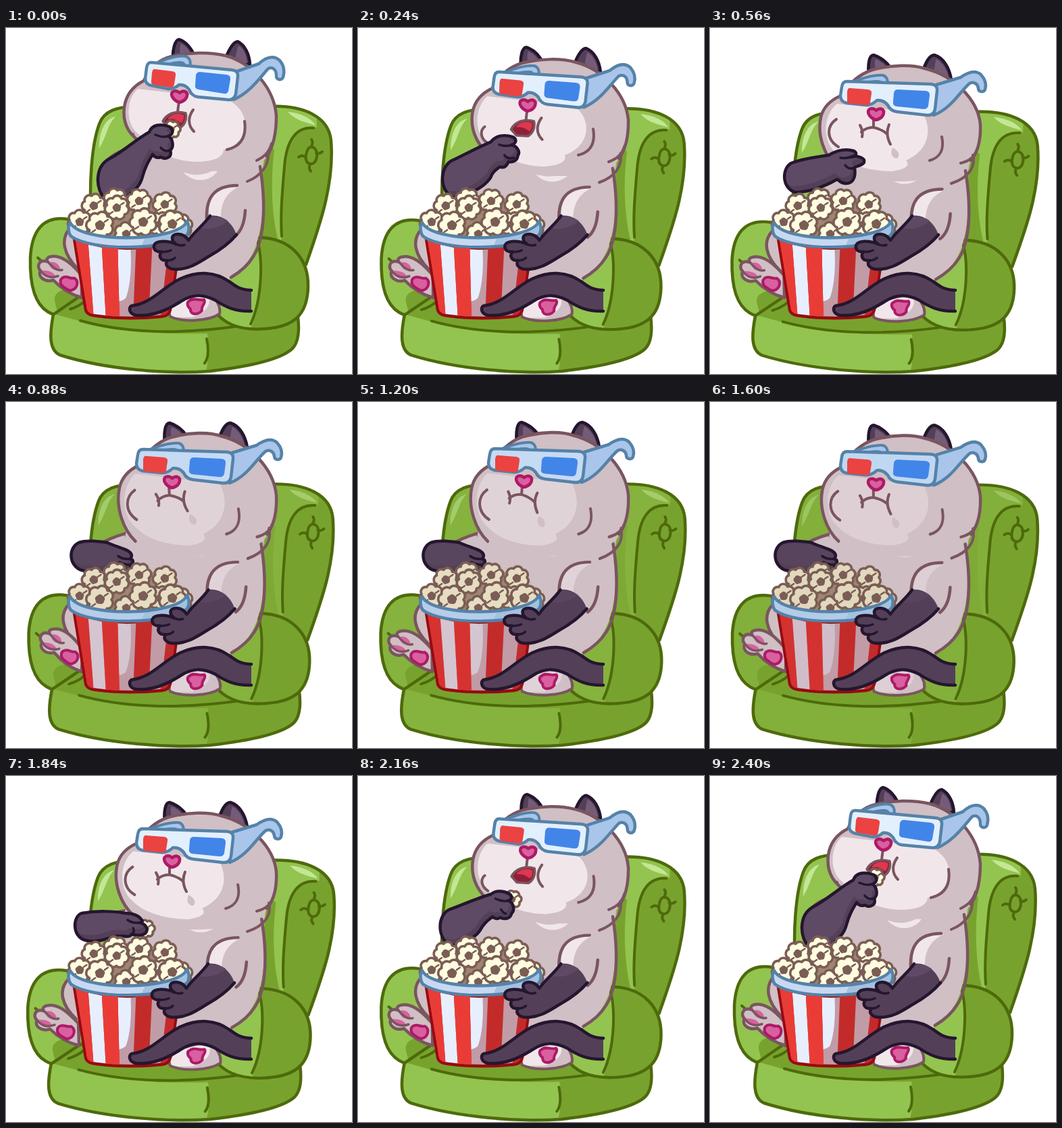
These frames come from a looping animation (512x512 px, 2.48 s). An HTML page:

```html
<!DOCTYPE html>
<html lang="en">
<head>
<meta charset="utf-8">
<title>Cat at the movies</title>
<style>
  html, body { margin: 0; width: 100%; height: 100%; overflow: hidden; background: #fff; }
  svg { display: block; width: 100%; height: 100%; }
  path { stroke-linecap: round; stroke-linejoin: round; }
</style>
</head>
<body>
<svg id="stage" viewBox="0 0 512 512"></svg>
<script>
const LOOP = 2480, STEP = 80;
const stage = document.getElementById('stage');
const moving = [], lights = [];
let clips = 0;

const C = {
  green: '#78a22e', lime: '#93c44f', leaf: '#4e6a0b', shine: '#c3e795',
  fur: '#d0bfc4', pale: '#f1e7eb', furInk: '#7a5560',
  dark: '#534058', soft: '#5f4a65', mauve: '#745c78', darkInk: '#25162f',
  pink: '#d9609f', pinkInk: '#ad1a66',
  sky: '#a9c5ea', ice: '#e2effd', steel: '#5582a8', rim: '#a5c1e0',
  red: '#c32b2b', hot: '#ea3c37', brick: '#980a12', rose: '#c19ba5', white: '#e7effe',
  corn: '#cdbfa6', cream: '#fffce0', husk: '#7a5d54'
};

function el(tag, attrs, parent = stage) {
  const node = document.createElementNS(stage.namespaceURI, tag);
  for (const k in attrs) node.setAttribute(k, attrs[k]);
  return parent.appendChild(node);
}
const group = parent => el('g', {}, parent);

// d is one path, or a list of poses blended by the named track
function path(g, d, attrs, track) {
  const poses = Array.isArray(d) ? d : [d];
  const node = el('path', { d: poses[0], ...attrs }, g);
  if (poses.length > 1) {
    moving.push({ node, track, text: poses[0], sets: poses.map(p => p.match(/-?[\d.]+/g).map(Number)) });
  }
  return node;
}
const fill = (g, d, color, track) => path(g, d, { fill: color }, track);
const line = (g, d, color, width = 4.5, track) =>
  path(g, d, { fill: 'none', stroke: color, 'stroke-width': width }, track);
function lit(g, d, color, track) {
  const node = fill(g, d, color, track);
  lights.push(node);
  return node;
}
// Filled shape, clipped highlights (path, colour, offset), then its outline
function solid(g, d, color, ink, glow = [], width = 4.5, track) {
  fill(g, d, color, track);
  if (glow.length) {
    const id = 'clip' + clips++;
    fill(el('clipPath', { id }, g), d, '#000', track);
    const inner = el('g', { 'clip-path': `url(#${id})` }, g);
    for (const [shape, tone, shift = '0 0'] of glow) {
      put(lit(inner, shape, tone, track), `translate(${shift})`);
    }
  }
  line(g, d, ink, width, track);
}
function put(node, transform) { node.setAttribute('transform', transform); }
function show(node, on) { node.setAttribute('visibility', on ? 'visible' : 'hidden'); }

// ---------- armchair ----------
const room = group(), chair = group(room);
solid(chair, 'M127 290C122 230 127 172 138 142C145 122 165 117 190 116L390 116C442 114 478 132 481 167C486 230 465 290 444 350L300 420L130 310Z',
  C.green, C.leaf, [
    ['M100 100H460V147C430 146 415 165 412 205C408 250 406 280 408 320H100Z', C.lime],
    ['M385 170L397 180C392 220 392 270 402 312L370 312Z', C.green],
    ['M138 178C137 155 146 134 162 131C150 143 150 158 138 178Z', C.shine],
    ['M417 124C437 126 452 134 458 144C445 140 428 137 417 124Z', C.shine]
  ]);
line(chair, 'M455 148C430 146 415 165 412 205C408 250 406 280 408 308', C.leaf, 4);
line(chair, 'M451 176C458 176 461 183 460 190C459 198 455 202 450 201C445 200 443 195 444 188C445 181 447 177 451 176ZM452 175Q455 169 452 165M459 185Q464 187 468 183M450 202Q447 207 451 212M443 191Q438 187 433 191', C.leaf, 4);

solid(chair, 'M130 283H92C55 277 38 300 36 340C35 380 42 408 62 420C75 428 90 428 110 426L160 420V283Z',
  C.green, C.leaf, [['M30 270H160V400L112 390C90 382 70 388 72 404L78 428H30Z', C.lime]]);
line(chair, 'M47 340L55 347', C.leaf, 4);

solid(chair, 'M70 424C64 455 64 477 80 484C150 506 240 512 300 508C360 501 405 490 422 476C434 466 434 445 432 428L330 380L112 395Z',
  C.green, C.leaf, [['M60 420L110 434C180 452 240 453 298 452C301 475 300 495 294 515H60Z', C.lime]]);
line(chair, 'M95 416Q108 412 117 404M110 433C170 450 250 455 345 441M297 460C300 475 300 488 294 496', C.leaf, 4);

solid(chair, 'M340 310H372C420 310 448 340 447 383C446 420 430 437 400 443C365 449 328 446 308 418L330 360Z',
  C.green, C.leaf, [['M300 300H371C381 335 379 400 362 446L300 450Z', C.lime]]);
line(chair, 'M371 312C381 340 379 402 362 438', C.leaf, 4);

// ---------- body ----------
const body = group(room);
const shoulder = [
  'M176 180C165 184 156 189 150 196L165 225L195 225Z',
  'M182 192C175 194 168 197 160 202L165 225L190 225Z',
  'M178 190C160 195 145 202 130 212L165 245L190 240Z',
  'M178 192C165 194 155 198 150 204L165 230L190 225Z'
];
shoulder.push(shoulder[0]);
solid(body, shoulder, C.fur, C.furInk, [], 4.5, 'arm');
fill(body, 'M180 178L168 250L95 292C82 312 84 335 108 360L130 410L245 420L330 372C365 350 386 310 379 210L385 170Z', C.fur);
line(body, 'M95 296C80 312 85 335 106 356M376 205C384 255 384 310 366 338C357 353 345 362 333 369', C.furInk);
lit(body, 'M262 213C282 221 300 217 315 205C314 222 282 236 262 213Z', C.pale);
lit(body, 'M301 282C297 250 308 238 346 234C325 244 317 260 318 284Z', C.pale);
line(body, 'M342 233C305 233 296 255 297 282M354 270C353 288 349 300 339 308', C.furInk);
solid(body, 'M243 427C235 408 262 396 298 392C312 400 318 412 316 423C300 434 262 436 243 427Z', C.fur, C.furInk,
  [['M240 428C235 405 270 398 298 394C305 405 300 420 275 428Z', C.pale]], 4);
solid(body, 'M271 404C277 398 285 404 293 402C297 407 288 411 290 418C283 426 272 424 273 416C268 412 267 406 271 404Z', C.pink, C.pinkInk, [], 4);

const foot = group();
solid(foot, 'M112 366C100 352 88 340 74 338C62 337 58 342 62 346C48 341 45 354 51 359C46 368 58 377 70 373C82 386 95 394 112 399Z', C.fur, C.furInk);
fill(foot, 'M64 347C72 344 79 350 80 356C72 362 64 355 64 347ZM53 359C63 358 72 362 73 368C64 373 54 366 53 359Z', C.pink);
line(foot, 'M62 346C69 354 75 360 83 358M51 359C57 367 66 371 77 367', C.furInk, 3.5);
solid(foot, 'M83 370C90 365 94 372 101 370C109 375 105 386 97 388C92 390 89 385 85 383C80 380 79 373 83 370Z', C.pink, C.pinkInk, [], 4);

// ---------- head ----------
const ears = group(), cheeks = group(), face = group();
function ear(d, inner) {
  solid(ears, d, C.dark, C.darkInk, [], 4.5, 'head');
  fill(ears, inner, C.mauve, 'head');
}
ear(['M247 48C246 32 250 18 256 17C266 20 275 30 280 44Z', 'M235 72C233 52 236 40 242 40C252 43 262 50 269 62Z'],
  ['M258 44C257 33 257 27 259 23C267 27 272 34 275 42Z', 'M245 64C244 55 243 50 245 46C253 49 258 54 263 60Z']);
ear(['M323 50C328 35 336 20 343 20C353 25 360 38 361 54Z', 'M313 70C318 52 325 40 332 40C345 44 354 58 357 76Z'],
  ['M338 50C341 38 342 30 344 26C352 31 356 40 357 52Z', 'M331 68C333 56 333 50 335 46C344 51 350 61 353 72Z']);

const skull = [
  'M206 176C190 162 171 150 175 117C178 96 190 85 204 78C212 60 225 47 245 42C270 36 300 35 325 41C365 52 397 90 400 130C400 155 396 175 386 190',
  'M188 206C170 190 158 160 164 132C168 115 180 106 194 100C207 80 222 68 240 62C270 54 300 54 318 60C360 70 396 105 400 142C401 165 397 183 386 196'
];
fill(cheeks, skull.map((d, i) => d + (i ? 'C380 230 220 240 188 206' : 'C370 222 235 220 206 176')), C.fur, 'head');
lit(cheeks, [
  'M195 90C178 105 176 140 195 156C215 176 240 198 285 198C310 197 322 190 322 180C362 170 366 122 325 105Z',
  'M188 112C166 130 166 170 188 186C205 204 240 212 270 212C292 208 296 203 290 196C326 180 328 148 315 126Z'
], C.pale, 'head');
line(cheeks, skull, C.furInk, 4.5, 'head');
line(cheeks, [
  'M188 157C188 159 190 162 194 165M353 138C356 160 349 175 327 180M388 183C390 202 378 219 357 227M393 171C389 185 381 191 371 196',
  'M187 135C172 145 172 165 190 176M343 161C347 180 340 192 325 196M389 188C393 205 384 221 357 230M396 178C391 192 383 197 371 200'
], C.furInk, 4, 'head');

const openMouth = group(face), shutMouth = group(face);
solid(openMouth, 'M232 138C238 126 252 122 266 126C268 136 264 144 257 148L240 147Z', '#8f1f38', C.furInk, [], 3.5);
fill(openMouth, 'M240 133C248 126 256 126 263 129Q264 137 259 141Q249 133 240 135Z', '#dc3850');
line(openMouth, 'M256 108L254 124M277 121C269 132 269 144 278 153', C.furInk, 4);
line(shutMouth, 'M242 134V147C236 147 229 149 224 154M242 147C250 149 257 152 262 157M222 144Q227 152 225 161M265 143Q259 157 267 172', C.furInk, 4);
fill(shutMouth, 'M270 177C279 181 282 188 277 193C270 193 266 186 270 177Z', C.fur);

const nose = group(face);
solid(nose, 'M0 9C-8 6 -13 -1 -10 -6C-7 -9 -2 -8 1 -5C5 -9 10 -8 12 -4C13 2 8 8 0 9Z', C.pink, C.pinkInk, [], 4.5);

// ---------- glasses ----------
solid(face, [
  'M222 53C236 45 255 40 266 42C272 44 274 50 272 58L264 56C264 52 262 51 258 51C250 51 244 52 238 55Z',
  'M208 81C226 74 244 69 256 70C262 72 264 78 262 86L254 84C254 80 252 79 248 79C240 79 232 80 226 83Z'
], C.sky, C.steel, [], 4, 'head');
solid(face, [
  'M342 64L374 53C385 43 396 40 405 48C412 56 412 66 410 73C408 78 399 77 400 70C400 62 395 57 388 60C374 76 360 96 337 106Z',
  'M335 84L371 73C382 65 393 62 401 69C408 77 409 85 407 91C405 96 397 95 397 89C396 82 390 79 384 82C369 95 358 118 331 129Z'
], C.sky, C.steel, [], 4.5, 'head');
solid(face, [
  'M216 51L334 62Q344 63 343 72L340 98Q337 108 327 106L284 102Q275 101 271 91Q265 83 256 84Q248 91 240 90L215 85Q206 83 206 75L208 59Q209 50 216 51Z',
  'M203 79L327 83Q337 84 336 93L333 120Q331 130 321 129L277 124Q267 123 263 114Q256 106 247 107Q240 114 231 114L202 111Q193 109 193 100L195 87Q196 79 203 79Z'
], C.sky, C.steel, [[[
  'M216 51L334 62Q344 63 343 72L340 98Q337 108 327 106L210 90L206 59Z',
  'M203 79L327 83Q337 84 336 93L333 120Q331 130 321 129L197 116L193 87Z'], C.ice]], 4.5, 'head');
fill(face, ['M221 61L246 64Q252 65 251 70L249 83Q248 89 242 88L219 84Q214 83 215 78L216 66Q217 60 221 61Z',
  'M208 89L234 91Q240 92 239 97L237 110Q236 115 230 114L207 112Q202 111 203 106L203 94Q204 88 208 89Z'], '#ea4341', 'head');
fill(face, ['M287 65L326 69Q333 70 332 76L329 93Q328 98 322 97L285 91Q279 90 280 84L281 70Q282 65 287 65Z',
  'M278 91L319 93Q326 94 325 100L323 115Q322 120 316 120L276 116Q270 115 271 109L272 96Q273 91 278 91Z'], '#4285e8', 'head');

// ---------- popcorn and raised arm ----------
function kernel(g, x, y, r, turn) {
  const ring = (n, R, bump) => {
    let d = '';
    for (let i = 0; i <= n; i++) {
      const a = turn + i * 2 * Math.PI / n;
      const at = `${(x + R * Math.cos(a)).toFixed(1)} ${(y + R * Math.sin(a)).toFixed(1)}`;
      d += i ? `A${bump} ${bump} 0 0 1 ${at}` : 'M' + at;
    }
    return d + 'Z';
  };
  const edge = ring(7, r, r * .47);
  fill(g, edge, C.corn);
  lit(g, edge, C.cream);
  line(g, edge, C.husk, 3.6);
  fill(g, ring(5, r * .38, r * .26), C.husk);
  line(g, `M${x - r * .4} ${y + r * .4}l${-r * .3} ${r * .2}M${x + r * .4} ${y - r * .3}l${r * .3} ${-r * .2}`, C.husk, 2.5);
}

const bite = group();
kernel(bite, 0, 0, 11, .4);

const arm = [
  'M148 256C130 235 133 205 152 194C175 182 192 165 212 154C216 143 228 141 242 146C249 151 247 158 240 160C247 163 249 176 243 181C246 190 238 196 229 191C223 193 219 190 217 187C211 197 206 205 202 220C198 236 188 242 172 256Z',
  'M126 243C106 237 106 208 120 200C140 192 160 191 176 188C188 181 200 178 213 182C220 186 214 190 208 191C218 188 230 192 228 199C222 206 216 203 214 207C216 220 212 231 200 230C192 229 190 224 188 224C172 233 150 243 126 243Z',
  'M112 249C92 242 92 215 108 208C120 204 135 206 150 208C160 213 172 216 180 220C187 224 187 228 184 232C190 234 188 240 184 241C186 248 182 252 176 252C172 252 168 250 166 248C160 250 150 252 140 252C130 252 120 251 112 249Z',
  'M117 243C98 238 98 208 112 203C135 199 160 200 176 203C188 203 197 207 200 212C203 215 202 217 198 217C208 219 211 228 206 233C200 237 192 236 186 234C184 238 178 238 175 237C165 236 158 237 152 240C140 244 128 246 117 243Z'
];
const creases = [
  'M240 160C234 162 228 161 221 158M243 181C237 183 232 181 229 177',
  'M208 191C202 193 198 193 193 192M214 207C208 209 203 207 200 203',
  'M184 232C176 233 170 231 166 228M184 241C178 241 172 239 168 237',
  'M198 217C190 218 184 216 180 213M186 234C190 231 190 228 188 225'
];
arm.push(arm[0]);
creases.push(creases[0]);
const paw = group();
solid(paw, arm, C.dark, C.darkInk, [[arm, C.soft, '-4 -9']], 4.5, 'arm');
line(paw, creases, C.darkInk, 3.5, 'arm');

const pile = group();
fill(pile, 'M104 304C105 275 125 256 160 254L210 250C250 258 266 280 262 304L180 320Z', '#a08573');
[[130, 263], [162, 255], [235, 261], [197, 256], [164, 266], [258, 293], [109, 287], [228, 290], [178, 305], [139, 292], [246, 290], [203, 287]]
  .forEach(([x, y], i) => kernel(pile, x, y, i > 8 ? 17 : 15, i * 1.3));

// ---------- bucket ----------
const bucket = group();
const stripe = (a, b, c, d) => `M${a} 310L${b} 310L${d} 432L${c} 432Z`;
solid(bucket, 'M101 312L118 417Q120 425 134 426Q180 432 230 427Q241 426 243 417L258 312Q180 340 101 312Z', C.rose, C.brick, [
  ['M95 305H182C188 345 184 385 177 400Q172 404 165 405L168 440H95Z', C.white]
]);
const cup = el('clipPath', { id: 'cup' }, bucket);
fill(cup, 'M103 314L120 417Q122 423 134 424Q180 430 230 425Q239 424 241 417L256 314Q180 340 103 314Z', '#000');
const bands = el('g', { 'clip-path': 'url(#cup)' }, bucket);
[[95, 121, 110, 130], [141, 165, 148, 168], [193, 217, 188, 211], [242, 265, 228, 250]].forEach((s, i) => {
  fill(bands, stripe(...s), C.red);
  if (i < 2) lit(bands, stripe(...s), C.hot);
});
solid(bucket, 'M95 288C91 292 92 303 96 308C125 330 238 330 268 306C272 300 271 291 268 286C255 317 110 319 95 288Z', C.rim, C.steel,
  [['M90 285C110 317 180 314 205 312L200 324C150 326 110 318 92 304Z', '#c6d9f1']]);

// ---------- tail and holding paw ----------
const tail = group();
const tailTop = 'M363 388C345 388 338 380 330 375C310 361 285 359 258 371C230 385 215 408 186 411C181 414 182 423 192 425C212 427 235 420 258 405C275 394 290 393 310 403C325 413 340 420 363 419';
fill(tail, tailTop + 'Z', C.dark);
line(tail, tailTop, C.darkInk);

const hold = group();
const grip = 'M302 278C292 292 280 300 270 314C262 302 246 303 246 311C246 316 249 318 252 320C240 314 221 314 219 322C218 329 224 332 230 331C225 338 229 345 239 344C233 350 241 357 250 357C270 358 285 347 300 338C318 328 331 318 341 306';
fill(hold, grip + 'C335 287 318 275 302 278Z', C.dark);
lit(hold, 'M302 280L288 296C305 300 322 292 328 285Q315 277 302 280Z', C.soft);
line(hold, grip, C.darkInk);
line(hold, 'M230 331Q238 332 244 329M239 344Q246 344 250 340M252 320Q258 323 264 321', C.darkInk, 3.5);

// ---------- motion ----------
const smooth = k => k * k * (3 - 2 * k);
const tracks = {
  arm: [[0, 0], [560, 1], [880, 2], [1600, 2], [1840, 3], [2400, 4]],
  head: [[0, 0], [480, 1], [1880, 1], [2400, 0]],
  sink: [[0, 0], [560, 1], [880, .7], [1440, .7], [1840, 1.1], [2400, 0]],
  bob: [[0, 0], [560, 0], [880, -9], [1200, -10], [1440, -9], [1840, -1], [2000, 0]],
  light: [[0, 1], [640, 1], [880, .5], [1200, .5], [1440, 0], [1840, 1]],
  foot: [[0, 0], [560, -1], [880, 3.5], [1200, -1], [1440, 3], [1840, -2], [2400, 0]],
  chew: [[0, 0], [560, 0], [880, -4], [1200, 4], [1440, -2], [1840, 0]],
  biteX: [[0, 245], [1600, 185], [1840, 207], [2400, 245]],
  biteY: [[0, 150], [1600, 250], [1840, 226], [2400, 150]]
};
function value(name, t) {
  const keys = tracks[name];
  const i = keys.findIndex(k => k[0] > t);
  if (i < 0) return keys[keys.length - 1][1];
  const [t0, a] = keys[i - 1], [t1, b] = keys[i];
  const k = (t - t0) / (t1 - t0);
  return a + (b - a) * (name === 'head' ? smooth(k) : k);
}
function blend({ text, sets }, k) {
  const i = Math.min(Math.floor(k), sets.length - 2), f = k - i;
  let n = 0;
  return text.replace(/-?[\d.]+/g, () => {
    const a = sets[i][n], b = sets[i + 1][n++];
    return (a + (b - a) * f).toFixed(2);
  });
}

function draw(t) {
  const v = {};
  for (const name in tracks) v[name] = value(name, t);
  for (const m of moving) m.node.setAttribute('d', blend(m, v[m.track]));
  for (const node of lights) node.setAttribute('opacity', v.light);
  put(room, `translate(250 510) scale(${1 + .016 * v.sink} ${1 - .02 * v.sink}) translate(-250 -510)`);
  put(ears, `translate(0 ${v.bob})`);
  put(face, `translate(0 ${v.bob})`);
  // The cheeks stretch up from the neck instead of leaving it
  put(cheeks, `translate(400 205) scale(${1 + .0018 * v.bob} ${1 - v.bob / 140}) translate(-400 -205)`);
  put(nose, `translate(${256 - 11 * v.head} ${101 + 26 * v.head})`);
  put(foot, `rotate(${v.foot} 108 395) translate(${-2 * Math.max(0, -v.foot)} 0)`);
  put(hold, `translate(${-3 * Math.min(1, v.sink * 1.2)} 0)`);
  put(bite, `translate(${v.biteX} ${v.biteY})`);
  show(bite, t < 160 || t >= 1680);
  const shut = v.head > .55;
  show(openMouth, !shut);
  show(shutMouth, shut);
  put(openMouth, `translate(${-11 * v.head} ${24 * v.head})`);
  put(shutMouth, `translate(${11 * (1 - v.head)} ${-24 * (1 - v.head)}) rotate(${v.chew} 243 148)`);
}

const start = performance.now();
let last = -1;
function tick() {
  const t = Math.floor((performance.now() - start) % LOOP / STEP) * STEP;
  if (t !== last) draw(last = t);
  requestAnimationFrame(tick);
}
tick();
</script>
</body>
</html>
```
